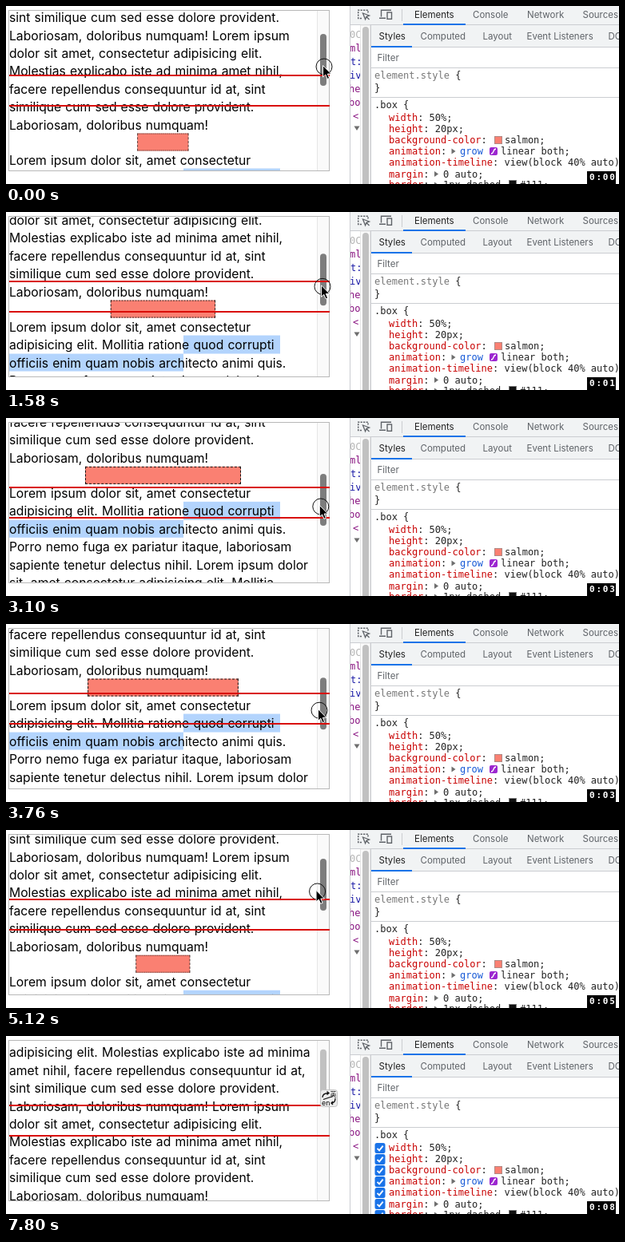
Animation of 767 by 223 pixels, one loop 7820 ms. Source, as an HTML page:

```html
<!DOCTYPE html>
<html lang="en">
<head>
<meta charset="utf-8">
<title>View timeline demo</title>
<style>
@property --b { syntax: "<number>"; inherits: true; initial-value: 159.5; }
@property --x { syntax: "<number>"; inherits: true; initial-value: 397; }
@property --d { syntax: "<number>"; inherits: true; initial-value: 0; }

html, body { margin: 0; width: 100%; height: 100%; overflow: hidden; background: #fff; }

/* --b: top of the salmon box, --x: pointer x, --d: pointer drop after release */
#stage {
  --thumb: calc(35 + (159.5 - var(--b)) * .354);
  position: relative; width: 767px; height: 223px; overflow: hidden;
  animation: scroll 7.82s linear infinite, point 7.82s linear infinite;
}
#stage div, #stage svg { position: absolute; }

@keyframes scroll {
  0%, .77% { --b: 159.5; }
  10.1%, 11.2% { --b: 135.5; }
  20.2% { --b: 110.6; }
  30.69% { --b: 79.5; }
  42.7%, 45.7% { --b: 54.5; }
  48.08% { --b: 68.5; }
  56.65% { --b: 109; }
  74.6%, 76.2% { --b: 206; }
  78%, 100% { --b: 210.8; }
}
@keyframes point {
  0% { --x: 397; --d: 0; }
  20.2% { --x: 395; }
  30.69% { --x: 394; }
  45.7% { --x: 392; }
  48.08% { --x: 391; }
  56.65% { --x: 392; }
  74.6%, 76.2% { --x: 385; }
  80.3% { --x: 384; --d: 0; }
  87.5%, 100% { --x: 490; --d: 195; }
}

.view {
  left: 3px; top: 5px; width: 400px; height: 200px; overflow: hidden;
  border: 1px solid #b8b8b8;
}
.doc {
  left: 0; top: 0; width: 385px; height: 22px;
  transform: translateY(calc((var(--b) - 6) * 1px));
  font: 15.7px/22.4px Inter, "Noto Sans", sans-serif; color: #000;
  word-spacing: .7px; white-space: pre;
}
.above { bottom: 21px; left: 0; }
.below { top: 23px; left: 0; }
.sel { background: #b3d4fd; height: 22.4px; }
.box {
  left: 95.25px; top: 0; width: 192.5px; height: 20px;
  background: salmon; border: 1px dashed #111;
  transform: scaleX(clamp(0, (206 - var(--b)) / 142, 1));
}
.track { left: 385px; top: 0; width: 14px; height: 200px; background: #fafafa; border-left: 1px solid #e6e6e6; }
.thumb {
  left: 393px; top: 0; width: 8px; height: 64.5px; border-radius: 4px; background: #7d7d7d;
  transform: translateY(calc(var(--thumb) * 1px));
  animation: fade 7.82s step-end infinite;
}
@keyframes fade { 82%, 100% { background: #c1c1c1; } }
.band { left: 4px; top: 86px; width: 401px; height: 36px; border: solid #d90d08; border-width: 2px 0; }

.late { visibility: hidden; }
.pick { animation: pick 7.82s step-end infinite; }
.checks { animation: checks 7.82s step-end infinite; }
@keyframes pick { 80.4%, 100% { visibility: visible; } }
@keyframes checks { 85.2%, 100% { visibility: visible; } }

.cursor {
  left: -11.5px; top: -11.5px;
  transform: translate(calc(var(--x) * 1px), calc((var(--thumb) + 40 + var(--d)) * 1px));
}
.ring { animation: ring 7.82s step-end infinite; }
@keyframes ring { 80.4%, 100% { visibility: hidden; } }

.ui { font: 11.5px Inter, Roboto, sans-serif; fill: #5f6368; }
.on { fill: #222; }
.code { font: 12px "DejaVu Sans Mono", monospace; fill: #222; white-space: pre; }
.prop { fill: #c80000; }
.dim { fill: #777; }
.tag { fill: #881280; }
.attr { fill: #1a1aa6; }

.clock {
  left: 727px; top: 207px; width: 36px; height: 16px; box-sizing: border-box; padding-left: 3px;
  background: #000; color: #fff; white-space: nowrap;
  font: bold 11px/16px "DejaVu Sans Mono", monospace; letter-spacing: 1.8px;
}
.clock::after { content: "0"; animation: tick 7.82s step-end infinite; }
@keyframes tick {
  0% { content: "0"; }
  12.42% { content: "1"; }
  24.84% { content: "2"; }
  37.26% { content: "3"; }
  49.68% { content: "4"; }
  62.1% { content: "5"; }
  74.52% { content: "6"; }
  86.94% { content: "7"; }
  99.36%, 100% { content: "8"; }
}
</style>
</head>
<body>
<div id="stage">
  <div class="view">
    <div class="doc">
      <div class="above">adipisicing elit. Molestias explicabo iste ad minima
amet nihil, facere repellendus consequuntur id at,
sint similique cum sed esse dolore provident.
Laboriosam, doloribus numquam! Lorem ipsum
dolor sit amet, consectetur adipisicing elit.
Molestias explicabo iste ad minima amet nihil,
facere repellendus consequuntur id at, sint
similique cum sed esse dolore provident.
Laboriosam, doloribus numquam!</div>
      <div class="sel" style="left:218px;top:44.4px;width:121px"></div>
      <div class="sel" style="left:0;top:66.8px;width:218px"></div>
      <div class="below">Lorem ipsum dolor sit, amet consectetur
adipisicing elit. Mollitia ratione quod corrupti
officiis enim quam nobis architecto animi quis.
Porro nemo fuga ex pariatur itaque, laboriosam
sapiente tenetur delectus nihil. Lorem ipsum dolor
sit, amet consectetur adipisicing elit. Mollitia</div>
      <div class="box"></div>
    </div>
    <div class="track"></div>
  </div>
  <div class="thumb"></div>
  <div class="band"></div>

  <svg width="767" height="223" viewBox="0 0 767 223">
    <defs>
      <g id="check">
        <rect width="13" height="13" rx="2.5" fill="#1a73e8"/>
        <path d="M3 6.8l2.6 2.6L10.2 3.6" fill="none" stroke="#fff" stroke-width="1.9"/>
      </g>
      <path id="arrow" d="M0 0l5 3.5L0 7z" fill="#6e6e6e"/>
    </defs>

    <!-- toolbars -->
    <path d="M430 0h337v24H430zM457 24h310v27H457z" fill="#f1f3f4"/>
    <path d="M430.5 0v223M430 23.5h337M456.5 24v199M457 51.5h310M457 77.5h310M457 114.5h310M495.5 4v15" stroke="#cbcdd1" fill="none"/>
    <path d="M497 22h78v2h-78zM457 50h51v2h-51z" fill="#1a73e8"/>
    <g fill="none" stroke="#5f6368" stroke-width="1.4">
      <path d="M445 15.5h-4.3V5.200H453V8.500" stroke-dasharray="2.2 1.3"/>
      <path d="M446.5 9l8 3-3.5 1.3-1.4 3.500zM451 13.500l3.500 3.500" stroke-width="1.3"/>
      <path d="M469.5 13.500V5.200H482M467 15.300h8"/>
      <rect x="477" y="8" width="5.5" height="8.300"/>
    </g>
    <g class="ui">
      <text class="on" x="511" y="14.8">Elements</text>
      <text x="584" y="14.8">Console</text>
      <text x="652" y="14.8">Network</text>
      <text x="721.5" y="14.8">Sources</text>
      <text class="on" x="466.5" y="41.8">Styles</text>
      <text x="518.5" y="41.8">Computed</text>
      <text x="596.5" y="41.8">Layout</text>
      <text x="651.5" y="41.8">Event Listeners</text>
      <text x="753.5" y="41.8">DOM</text>
      <text x="464.5" y="69">Filter</text>
    </g>

    <!-- element tree edge -->
    <svg x="431" y="24" width="13" height="199" viewBox="431 24 13 199">
      <g class="code">
        <text x="430" y="40" fill="#b5b5b5">0C</text>
        <text class="tag" x="430" y="57">ml</text>
        <text class="attr" x="431" y="74">t:</text>
        <text class="attr" x="430" y="91">iv</text>
        <text class="tag" x="429" y="108">he</text>
        <text class="tag" x="429" y="125">bo</text>
        <text class="tag" x="434" y="142">&lt;</text>
      </g>
      <path d="M435.5 150.5h7l-3.5 5.500z" fill="#6e6e6e"/>
    </svg>
    <path d="M443.5 24h12v210h-12z" fill="#fafafa" stroke="#e6e6e6"/>
    <rect x="446" y="26" width="8" height="210" rx="4" fill="#c1c1c1"/>

    <!-- style rules -->
    <g class="code">
      <text x="461" y="91"><tspan class="dim">element.style</tspan> {</text>
      <text x="461" y="107">}</text>
      <text x="461" y="128">.box {</text>
      <text x="479" y="144"><tspan class="prop">width</tspan>: 50%;</text>
      <text x="479" y="158"><tspan class="prop">height</tspan>: 20px;</text>
      <text x="479" y="172"><tspan class="prop">background-color</tspan>:</text>
      <text x="624" y="172">salmon;</text>
      <text x="479" y="186"><tspan class="prop">animation</tspan>:</text>
      <text x="568" y="186" fill="#1558d6">grow</text>
      <text x="619" y="186">linear both;</text>
      <text x="479" y="200"><tspan class="prop">animation-timeline</tspan>: view(block 40% auto);</text>
      <text x="479" y="214.5"><tspan class="prop">margin</tspan>:</text>
      <text x="547" y="214.5">0 auto;</text>
      <text x="479" y="228"><tspan class="prop">border</tspan>:</text>
      <text x="547" y="228">1px dashed</text>
      <text x="643" y="228">#111;</text>
    </g>
    <rect x="611.5" y="163.5" width="9" height="9" fill="salmon" stroke="#b08a85"/>
    <rect x="629.5" y="218.5" width="9" height="9" fill="#111" stroke="#777"/>
    <use href="#arrow" x="557.5" y="178.5"/>
    <use href="#arrow" x="536" y="207"/>
    <use href="#arrow" x="536" y="220.5"/>
    <rect x="605" y="177" width="10" height="10" rx="2" fill="#9c27d0"/>
    <path d="M607 185c4 0 2-6 6-6" fill="none" stroke="#fff" stroke-width="1.3"/>

    <g class="late checks">
      <use href="#check" x="461.5" y="134"/>
      <use href="#check" x="461.5" y="148"/>
      <use href="#check" x="461.5" y="162"/>
      <use href="#check" x="461.5" y="176"/>
      <use href="#check" x="461.5" y="190"/>
      <use href="#check" x="461.5" y="204"/>
      <use href="#check" x="461.5" y="218"/>
    </g>

    <!-- language button -->
    <g class="late pick">
      <rect x="393.5" y="67.5" width="21" height="21" rx="3" fill="#ececec" stroke="#c4c4c4"/>
      <path d="M396 77c0-4 3-5.500 8-5.500M401.500 69.500l2.500 2-2.500 2M412 78c0 4-2 6-5 6M409 82l-2 2 2 2M397 79.500l12-4" fill="none" stroke="#111" stroke-width="1.3"/>
      <text x="395" y="87" font-family="Inter, sans-serif" font-size="9" fill="#111">en</text>
      <text x="405.5" y="75.5" font-family="'Noto Sans CJK SC', 'Noto Sans CJK', sans-serif" font-size="8" fill="#111">英</text>
    </g>
  </svg>

  <div class="clock">0:0</div>

  <svg class="cursor" width="30" height="34" viewBox="-12 -12 30 34">
    <circle class="ring" r="10" fill="none" stroke="#111"/>
    <path d="M-1.5-1.5v14.5l3.3-3 2.3 5.400 2.500-1-2.300-5.300h4.600z" fill="#000" stroke="#fff"/>
  </svg>
</div>
</body>
</html>
```
